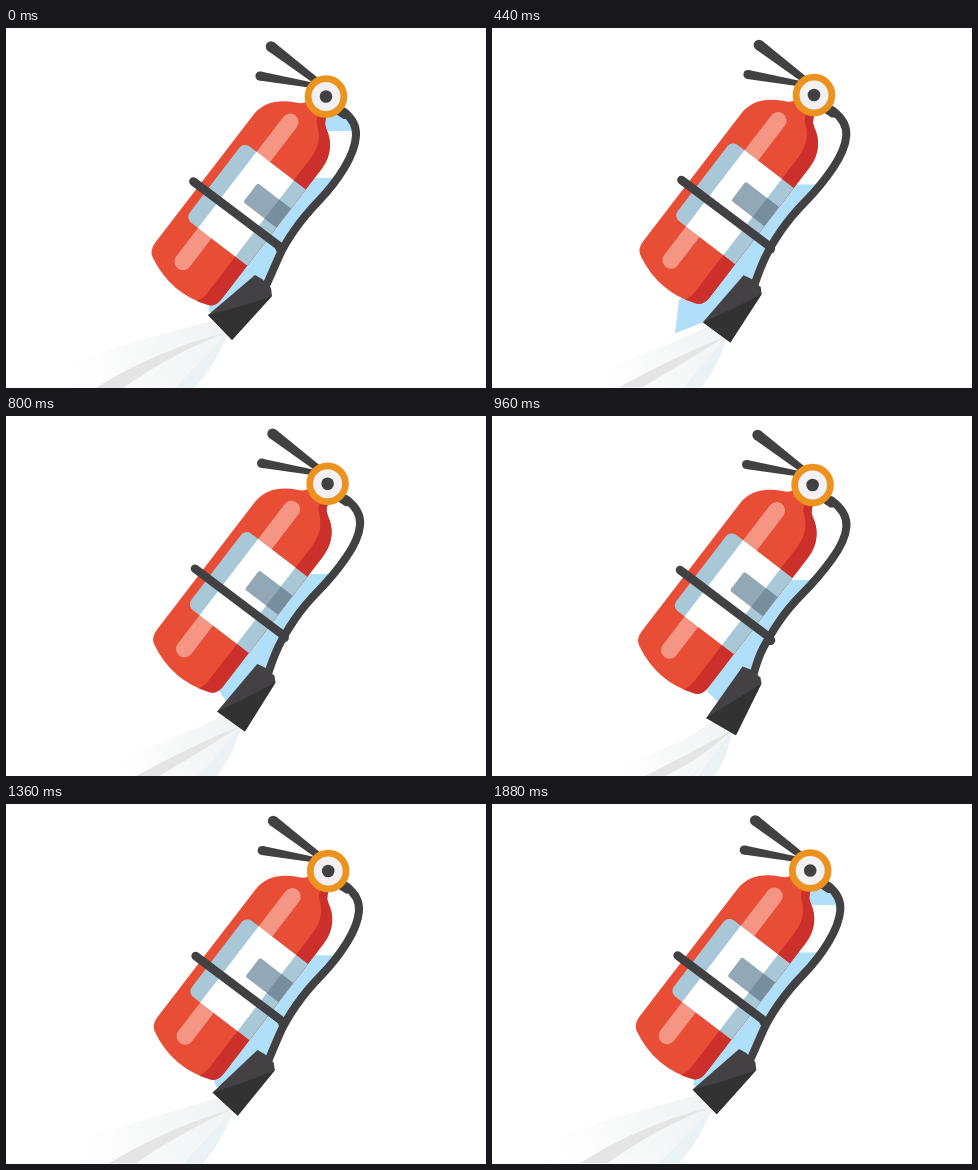
Animation, 480 px wide and 360 px high, one loop 1920 ms. Source, as an HTML page with a canvas:

```html
<!DOCTYPE html>
<html lang="en">
<head>
<meta charset="utf-8">
<title>Fire extinguisher</title>
<style>
html, body { margin: 0; width: 100%; height: 100%; overflow: hidden; background: #fff; }
canvas { display: block; width: 480px; height: 360px; }
</style>
</head>
<body>
<canvas id="stage" width="480" height="360"></canvas>
<script>
const c = document.getElementById('stage').getContext('2d');
const LOOP = 1920, STEP = 40, SWING = 640, PEAK = 275;
const DARK = '#414042', BLUE = '#afdff9';

// [step, dx, dy] of the shaking body
const SHAKE = [
  [0, 0, 0], [4, 1.5, -.3], [8, .4, -1.2], [11, 2, -1.5], [16, .5, -.5],
  [20, 1.6, -.8], [24, .6, .5], [29, .2, -.8], [34, 2.2, -1.5],
  [40, .5, -1.6], [44, .8, -.5], [47, -1.8, -2], [48, 0, 0]
];

const mix = (a, b, k) => a + (b - a) * k;
const mixPts = (a, b, k) => a.map((p, i) => [mix(p[0], b[i][0], k), mix(p[1], b[i][1], k)]);

function shakeAt(step) {
  const i = SHAKE.findIndex(k => k[0] > step);
  const a = SHAKE[i - 1], b = SHAKE[i];
  const k = (step - a[0]) / (b[0] - a[0]), e = k * k * (3 - 2 * k);
  return [mix(a[1], b[1], e), mix(a[2], b[2], e)];
}

function swingAt(t) {
  const p = t % SWING;
  const turn = p < PEAK ? p / PEAK : 1 + (p - PEAK) / (SWING - PEAK);
  return (1 - Math.cos(Math.PI * turn)) / 2;
}

function poly(pts, fill) {
  c.beginPath();
  pts.forEach(p => c.lineTo(p[0], p[1]));
  c.closePath();
  c.fillStyle = fill;
  c.fill();
}

function smooth(pts) {
  const n = pts.length - 1;
  c.moveTo(...pts[0]);
  for (let i = 1; i < n; i++) {
    const end = i === n - 1 ? pts[n] : mixPts([pts[i]], [pts[i + 1]], .5)[0];
    c.quadraticCurveTo(...pts[i], ...end);
  }
}

function line(pts, color, width) {
  c.beginPath();
  pts.forEach(p => c.lineTo(p[0], p[1]));
  c.strokeStyle = color;
  c.lineWidth = width;
  c.lineCap = 'round';
  c.stroke();
}

function disc(x, y, r, fill) {
  c.beginPath();
  c.arc(x, y, r, 0, 2 * Math.PI);
  c.fillStyle = fill;
  c.fill();
}

function rect(x, y, w, h, fill) {
  c.fillStyle = fill;
  c.fillRect(x, y, w, h);
}

function curve(start, ctrl, end, back, fill) {
  c.beginPath();
  c.moveTo(...start);
  c.quadraticCurveTo(...ctrl, ...end);
  c.lineTo(...back);
  c.quadraticCurveTo(ctrl[0] + 14, ctrl[1] + 4, ...start);
  c.fillStyle = fill;
  c.fill();
}

function spray(t, s) {
  const x = mix(218, 236, s), y = mix(304, 314, s);
  const reach = mix(65, 130, s) + 8 * Math.sin(t * Math.PI / 960);

  const g = c.createLinearGradient(x, y, reach, 360);
  g.addColorStop(0, 'rgba(228,231,233,.5)');
  g.addColorStop(.6, 'rgba(238,240,241,.4)');
  g.addColorStop(1, 'rgba(250,250,250,0)');
  c.beginPath();
  c.moveTo(x - 12, y - 11);
  c.quadraticCurveTo(mix(150, 190, s), mix(307, 330, s), reach - 30, mix(342, 360, s));
  c.lineTo(reach - 30, 362);
  c.lineTo(mix(180, 220, s), 362);
  c.lineTo(x + 5, y + 4);
  c.fillStyle = g;
  c.fill();

  curve([x + 4, y], [mix(150, 198, s), mix(322, 338, s)],
    [mix(88, 152, s), 361], [mix(116, 172, s), 361], '#e5e5e5');
  curve([x + 3, y + 3], [mix(195, 224, s), 334],
    [mix(168, 206, s), 361], [mix(188, 222, s), 361], '#eaf2f5');

  // thin drops flying away from the nozzle
  for (let i = 0; i < 4; i++) {
    const f = (t / SWING + i * .29) % 1;
    const r = 45 + f * 140, a = mix(2.75, 2.35, s) - i * .13;
    const px = x + r * Math.cos(a), py = y + r * Math.sin(a) * .8;
    const alpha = .35 * (1 - f * .6);
    line([[px, py], [px - 16, py + 17]], `rgba(200,205,208,${alpha})`, .8);
  }
}

function splash(t, s, hose) {
  const burst = Math.max(0, 1 - Math.abs(t - 440) / 100);
  const tail = mixPts(
    mixPts([[203, 284], [203, 273]], [[226, 285], [215, 275]], s),
    [[181, 307], [185, 274]], burst);
  const top = t < 120 || t >= 1840 ? 103 : s < .05 ? 94 : 80;
  c.save();
  c.beginPath();
  c.rect(290, 80, 70, top - 80);
  c.moveTo(150, 150 + 14 * s);
  c.lineTo(360, 150 + 14 * s);
  c.lineTo(360, 330);
  c.lineTo(150, 330);
  c.clip();
  c.beginPath();
  smooth(hose);
  [[228, 288], ...tail, [225, 230], [300, 130], [312, 90]].forEach(p => c.lineTo(...p));
  c.fillStyle = BLUE;
  c.fill();
  c.restore();
}

function tankPath() {
  c.beginPath();
  c.moveTo(-12, -142);
  c.lineTo(-14, -132);
  c.quadraticCurveTo(-15, -128, -22, -125);
  c.bezierCurveTo(-38, -117, -48, -105, -48, -89);
  c.lineTo(-48, 71);
  c.quadraticCurveTo(-48, 82, -41, 85);
  c.quadraticCurveTo(-5, 103, 32, 89);
  c.quadraticCurveTo(39, 86, 39, 76);
  c.lineTo(39, -88);
  c.bezierCurveTo(39, -105, 30, -117, 18, -123);
  c.quadraticCurveTo(10, -127, 10, -142);
  c.closePath();
}

function tank() {
  c.save();
  c.translate(231, 187);
  c.rotate(37.5 * Math.PI / 180);
  c.save();
  tankPath();
  c.fillStyle = '#e84d36';
  c.fill();
  c.clip();

  c.beginPath();
  c.moveTo(2, -142);
  c.quadraticCurveTo(2, -126, 8, -121);
  c.bezierCurveTo(20, -112, 24, -102, 24, -88);
  c.lineTo(24, 80);
  c.quadraticCurveTo(24, 90, 17, 98);
  c.lineTo(50, 98);
  c.lineTo(50, -142);
  c.fillStyle = '#cc302a';
  c.fill();

  line([[-14.5, -106], [-14.5, 70]], '#f59583', 17);

  c.beginPath();
  c.roundRect(-39, -62, 90, 96, 7);
  c.fillStyle = '#a8c7d7';
  c.fill();
  rect(-23, -62, 47, 96, '#fff');
  c.beginPath();
  c.roundRect(-3, -38, 42, 24, 2);
  c.fillStyle = '#93a8b6';
  c.fill();
  rect(24, -38, 15, 24, '#768e9d');
  c.restore();

  line([[-55, 0], [55, -1]], DARK, 8.5);
  c.restore();
}

function lever(x1, y1, r1, x2, y2, r2) {
  const a = Math.atan2(y2 - y1, x2 - x1) + Math.PI / 2;
  const dx = Math.cos(a), dy = Math.sin(a);
  poly([
    [x1 + dx * r1, y1 + dy * r1], [x2 + dx * r2, y2 + dy * r2],
    [x2 - dx * r2, y2 - dy * r2], [x1 - dx * r1, y1 - dy * r1]
  ], DARK);
  disc(x1, y1, r1, DARK);
}

function nozzle(s) {
  const p = mixPts(
    [[202, 287], [249, 247], [256, 251], [265, 260], [266, 268], [226, 312]],
    [[214, 302], [250, 250], [258, 253], [268, 261], [269, 267], [244, 319]], s);
  const fold = mixPts([[238, 278]], [[238, 287]], s)[0];
  poly(p, '#434144');
  c.beginPath();
  c.moveTo(...p[0]);
  c.quadraticCurveTo(...fold, ...p[4]);
  c.lineTo(...p[5]);
  c.fillStyle = '#333233';
  c.fill();
}

function draw(t) {
  const s = swingAt(t);
  const [dx, dy] = shakeAt(t / STEP);
  const hose = mixPts(
    [[338, 84], [351, 94], [349, 122], [328, 157], [299, 187], [278, 217], [268, 240], [260, 258]],
    [[339, 84], [355, 96], [353, 124], [326, 161], [295, 192], [276, 221], [265, 242], [261, 258]], s);

  rect(0, 0, 480, 360, '#fff');
  c.save();
  c.translate(dx, dy);
  spray(t, s);
  splash(t, s, hose);
  tank();

  lever(265, 18.5, 5.3, 309, 52, 3.5);
  lever(254, 48, 4.6, 305, 57, 2.8);
  line([[333, 82], [339, 86]], DARK, 10);
  c.beginPath();
  smooth(hose);
  c.strokeStyle = DARK;
  c.lineWidth = 8;
  c.stroke();
  disc(mix(274, 278, s), mix(220, 224, s), 4.8, DARK);
  nozzle(s);

  disc(320, 68.5, 21.3, '#ec921f');
  disc(320, 68.5, 14.5, '#f2f0f2');
  disc(320, 68.5, 6.3, DARK);
  c.restore();
}

function tick() {
  const t = performance.now() % LOOP;
  draw(Math.floor(t / STEP) * STEP);
  requestAnimationFrame(tick);
}
tick();
</script>
</body>
</html>
```
